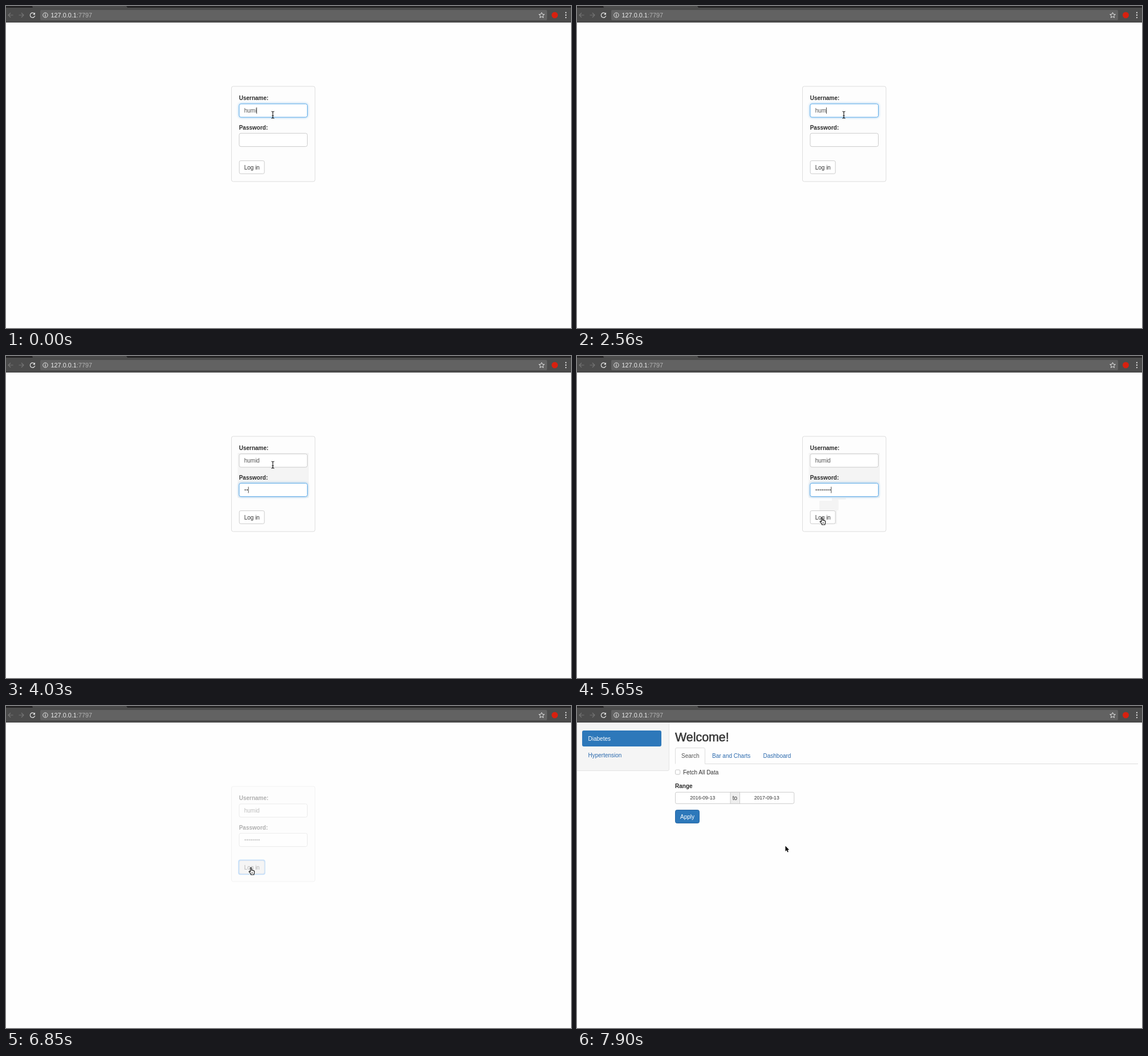
An HTML page for the animation above (8 s loop, 991 px wide and 565 px high).

```html
<!DOCTYPE html>
<html lang="en">
<head>
<meta charset="utf-8">
<title>Login demo</title>
<style>
  html, body { margin: 0; width: 100%; height: 100%; overflow: hidden; background: #fefefe; }
  svg { display: block; width: 991px; height: 565px; }
  text { font: 10px "Liberation Sans", Arial, sans-serif; fill: #333; white-space: pre; }
  .bold { font-weight: bold; fill: #2b2b2b; }
  .line { fill: none; stroke: #e6e6e6; stroke-width: 1.2; }
  .field { fill: #fff; stroke: #ccc; }
  .value { fill: #555; }
  .link { fill: #2a69ad; }
  .white { fill: #fff; }
  .blue { fill: #2d78ba; }
  .date { font-size: 8.6px; text-anchor: middle; }
  .shade { fill: #f4f4f4; }
</style>
</head>
<body>
<svg viewBox="0 0 991 565">
  <rect width="991" height="565" fill="#fefefe"/>

  <g id="browser">
    <rect width="991" height="29" fill="#4c4c4c"/>
    <path d="M0 0H46L47 3H0zM211 0H991V3H213z" fill="#242324"/>
    <path d="M0 28.5H991" stroke="#3c3c3c"/>
    <rect x="60" y="7" width="889" height="18" rx="2" fill="#626262"/>
    <path d="M12.5 16H4M8 12L4 16L8 20M22.500 16H31M27 12L31 16L27 20" class="line" style="stroke:#757575"/>
    <path d="M49.700 13.300A4.200 4.200 0 1 0 50.700 17" class="line"/>
    <path d="M51 11.300V15.300H47z" fill="#e6e6e6"/>
    <circle cx="69" cy="16" r="4.200" class="line" style="stroke-width:1"/>
    <path d="M69 13.200V14.400M69 15.300V18.700" class="line"/>
    <text x="78.500" y="20" style="font-size:10.9px;fill:#ededed">127.0.0.1<tspan fill="#b2b2b2">:7797</tspan></text>
    <path d="M939.500 11.300L940.900 14.500L944.300 14.800L941.700 17.100L942.500 20.500L939.500 18.700L936.500 20.500L937.300 17.100L934.700 14.800L938.100 14.500z" class="line" style="stroke-width:1"/>
    <circle cx="962.500" cy="16" r="5.500" fill="#d8200f"/>
    <path d="M982 11.700h0M982 16h0M982 20.300h0" class="line" style="stroke-width:2.300;stroke-linecap:round"/>
  </g>

  <g id="login">
    <rect x="395.500" y="141" width="146.500" height="167" rx="3" fill="#fdfdfd" stroke="#ddd"/>
    <g id="shades" class="shade">
      <rect id="fieldShade" x="406.500" y="170" width="124.500"/>
      <path id="trailA" d="M447 249H471.500V252H447z"/>
      <path id="trailB" d="M447 249H458.500V268H447z"/>
      <path id="trailC" d="M425 254H458.500V271H456V295H425z"/>
      <path id="buttonShade" d="M407 269H456V297H407z"/>
    </g>
    <text x="408.700" y="165" class="bold">Username:</text>
    <text x="408.700" y="216.500" class="bold">Password:</text>
    <rect id="nameField" class="field" x="409" y="171.800" width="119.500" height="23.300" rx="3"/>
    <rect id="passField" class="field" x="409" y="223.300" width="119.500" height="23.300" rx="3"/>
    <text id="name" x="417.700" y="187.200" class="value"></text>
    <g id="dots" fill="#555"></g>
    <path id="caret" stroke="#333" stroke-width=".9"/>
    <rect id="ring" x="408.500" y="270.800" width="45" height="24.200" rx="2.500" fill="none" stroke="#65acf4" stroke-width="2.600"/>
    <rect id="button" x="409.200" y="271.500" width="44" height="22.800" rx="2.500" stroke="#ccc"/>
    <text x="417.700" y="286.500">Log in</text>
  </g>

  <g id="dashboard">
    <path d="M0 29H161.500V111Q161.500 113.500 159 113.500H0z" fill="#f5f5f5"/>
    <path d="M161.500 29V111Q161.500 113.500 159 113.500H0" fill="none" stroke="#e3e3e3"/>
    <rect x="9" y="43" width="139" height="28" rx="3" class="blue"/>
    <text x="19.500" y="60.500" class="white">Diabetes</text>
    <text x="19.500" y="90" class="link">Hypertension</text>
    <text x="172" y="62" style="font-size:21.4px;stroke:#333;stroke-width:.5px">Welcome!</text>
    <path d="M172.500 101.500V76Q172.500 73.500 175 73.500H222Q224.500 73.500 224.500 76V101.500H984" fill="none" stroke="#ddd"/>
    <text x="183" y="91" style="fill:#555">Search</text>
    <text x="237" y="91" class="link">Bar and Charts</text>
    <text x="326.500" y="91" class="link">Dashboard</text>
    <rect x="172.500" y="112" width="8.300" height="8" rx="2" fill="#fff" stroke="#c4c4c4"/>
    <text x="186" y="119.700">Fetch All Data</text>
    <text x="172" y="144" class="bold">Range</text>
    <rect x="172.500" y="151.300" width="208.300" height="20" rx="2.500" class="field"/>
    <rect x="269" y="151.300" width="16.500" height="20" fill="#eee" stroke="#ccc"/>
    <text x="220.300" y="164.300" class="date">2016-09-13</text>
    <text x="272.800" y="164.700">to</text>
    <text x="332.700" y="164.300" class="date">2017-09-13</text>
    <rect x="172.500" y="182.500" width="42" height="23" rx="3" class="blue" stroke="#2968a4"/>
    <text x="181" y="197.800" class="white">Apply</text>
  </g>

  <g id="beam" class="cursor">
    <path d="M-2.500 -6Q0 -6 0 -4.500V4.500Q0 6 -2.500 6M2.500 -6Q0 -6 0 -4.500V4.500Q0 6 2.500 6M-1.500 1.500H1.500" fill="none" stroke="#111" stroke-width="1.100"/>
  </g>
  <g id="hand" class="cursor">
    <path d="M3.200 7.500V1.800Q3.200 .6 4.200 .6T5.200 1.800V5.200Q6.800 4.500 7.100 5.600Q8.600 5.100 8.800 6.200Q10.200 6 10.200 7.400V9.500Q10.200 10.900 9.400 11.800V13H4V11.600L1 8.300Q.4 7.200 1.300 6.900Q2.200 6.700 3.200 7.500z" fill="#fff" stroke="#111" stroke-width="1.100"/>
    <path d="M5.500 8.500V11M7.200 8.500V11" stroke="#111" stroke-width=".6"/>
  </g>
  <g id="arrow" class="cursor">
    <path d="M0 0V9.500L2.200 7.500L3.800 11L5.300 10.400L3.800 7H6.700z" fill="#000" stroke="#fff" stroke-width=".8" paint-order="stroke"/>
  </g>
</svg>

<script>
const LOOP = 8000;
const USER = "humid";
const FOCUS = [102, 175, 233];
const $ = id => document.getElementById(id);
const show = (id, on) => { $(id).style.display = on ? "" : "none"; };

// Each track is a list of [start time, value]; values hold until the next entry.
const nameLength = [[0, 4], [300, 5], [780, 4], [930, 3], [1080, 2], [1220, 1], [1370, 0],
  [2260, 1], [2410, 2], [2560, 3], [2860, 4], [3000, 5]];
const passLength = [[0, 0], [3890, 1], [4030, 2], [4330, 3], [4470, 4],
  [4770, 5], [4920, 6], [5060, 7], [5210, 8]];
const nameFocus = [[0, 1], [3150, .4], [3290, 0]];
const passFocus = [[0, 0], [3150, .6], [3290, 1], [5950, 0]];
const caretOn = [[0, true], [1810, false], [2260, true], [3590, false], [3890, true], [5800, false]];
const fade = [[0, 1], [6250, .96], [6700, .7], [6850, .37]];
const cursor = [[0, ["beam", 468, 191]], [5360, ["beam", 450, 246]], [5510, ["arrow", 451, 254]],
  [5650, ["hand", 425.500, 283]], [7300, ["arrow", 431.500, 284.500]], [7900, ["arrow", 365.500, 245.500]]];

const at = (track, t) => track.findLast(([start]) => start <= t)[1];

for (let i = 0; i < 8; i++) {
  const dot = document.createElementNS("http://www.w3.org/2000/svg", "circle");
  dot.setAttribute("cx", 419.600 + i * 3.450);
  dot.setAttribute("cy", 235);
  dot.setAttribute("r", 1.150);
  $("dots").append(dot);
}

function setFocus(id, level) {
  const { style } = $(id);
  style.stroke = `rgb(${FOCUS.map(c => 204 + (c - 204) * level)})`;
  style.filter = level ? `drop-shadow(0 0 2px rgba(${FOCUS},${.75 * level}))` : "none";
}

function drawShades(t) {
  show("shades", t >= 3150 && t < 6700);
  $("fieldShade").setAttribute("height", t < 5950 ? 79 : 127);
  show("trailA", t >= 5360);
  show("trailB", t >= 5510);
  show("trailC", t >= 5650);
  show("buttonShade", t >= 5800);
}

function drawForm(t) {
  $("login").style.opacity = at(fade, t);
  drawShades(t);
  setFocus("nameField", at(nameFocus, t));
  setFocus("passField", at(passFocus, t));

  const dots = at(passLength, t);
  $("name").textContent = USER.slice(0, at(nameLength, t));
  [...$("dots").children].forEach((dot, i) => { dot.style.display = i < dots ? "" : "none"; });

  const inName = t < 3150;
  const x = inName ? 418 + $("name").getComputedTextLength() : 418.300 + dots * 3.450;
  $("caret").setAttribute("d", `M${x} ${inName ? 178 : 229.500}v11`);
  show("caret", at(caretOn, t));

  const pressed = t >= 5800;
  show("ring", pressed);
  $("button").style.fill = pressed ? "#e6e6e6" : "#fff";
  $("button").style.stroke = pressed ? "#a9bfd6" : "#ccc";
}

function drawCursor(t) {
  const [kind, x, y] = at(cursor, t);
  for (const id of ["beam", "hand", "arrow"]) show(id, id === kind);
  $(kind).setAttribute("transform", `translate(${x} ${y})`);
}

function draw(now) {
  const t = now % LOOP;
  const loggedIn = t >= 7300;
  show("login", !loggedIn);
  show("dashboard", loggedIn);
  if (!loggedIn) drawForm(t);
  drawCursor(t);
}

const start = performance.now();
function tick() {
  draw(performance.now() - start);
  requestAnimationFrame(tick);
}
tick();
</script>
</body>
</html>
```
